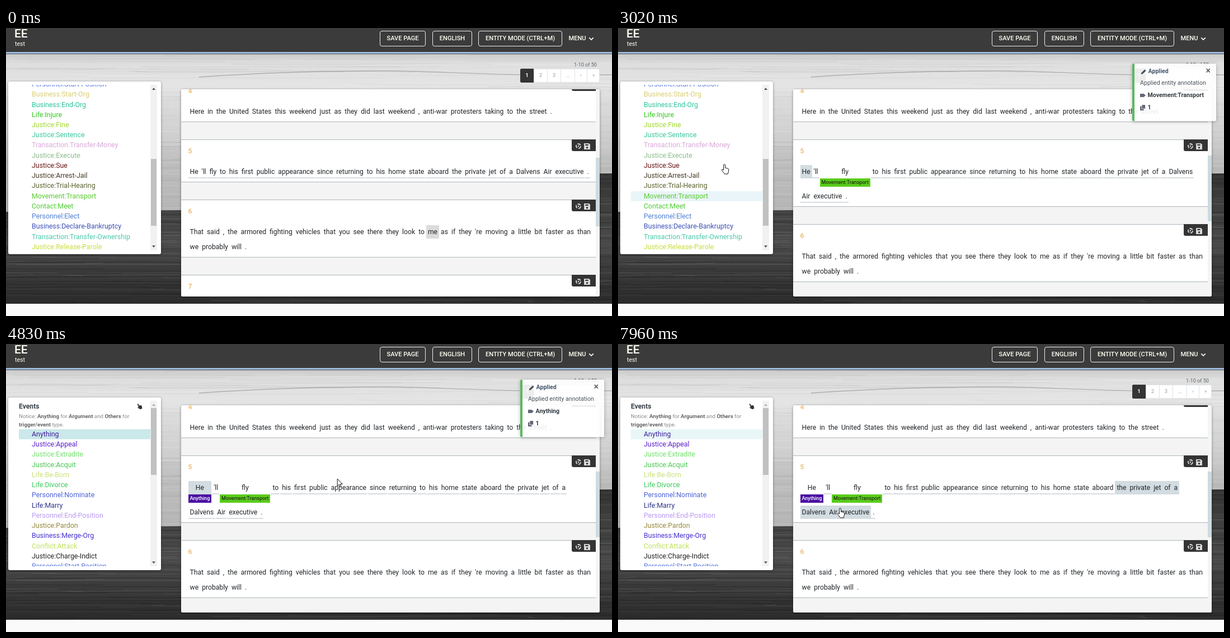
An HTML page with a canvas that plays this animation: 1083x517 px, repeating every 8 s.

```html
<!DOCTYPE html>
<html lang="en">
<head>
<meta charset="utf-8">
<title>Event annotation</title>
<style>
html, body { margin: 0; width: 100%; height: 100%; overflow: hidden; background: #fafafa; }
body { position: relative; font: 12.16px/20px Roboto, sans-serif; color: #212529; }
div, canvas, svg { position: absolute; box-sizing: border-box; }
b { font-weight: 500; }
.label { white-space: pre; height: 20px; }
#wood { left: 0; top: 47px; }
#head { left: 0; top: 0; width: 100%; height: 47px; background: linear-gradient(#3b3b3b 43px, #9dbbdc 43px 46px, #4a4f55 46px); color: #fffff4; }
.btn { top: 5px; height: 28px; border: 1px solid #eee; border-radius: 4px; font: 500 11.1px/26px Roboto, sans-serif; text-align: center; }
.card { background: #fff; border-radius: 3px; box-shadow: 0 1px 4px #0006; overflow: hidden; }
#side { left: 4px; top: 96px; width: 273px; height: 310px; }
#view { left: 19px; top: 6px; width: 235px; height: 297px; overflow: hidden; }
#list { left: 0; top: 0; width: 235px; }
.row { left: 0; width: 235px; height: 18.24px; padding-left: 23px; font-size: 12.4px; line-height: 18.24px; white-space: pre; }
.hint { font-size: 9.73px; color: #888; }
.hint b { color: #666; font-weight: 700; }
#bar { left: 254px; top: 6px; width: 12px; height: 297px; background: #f1f1f1; }
#thumb { left: 1px; width: 10px; height: 120px; background: #c1c1c1; }
#main { left: 313px; top: 110px; width: 748px; height: 372px; }
#flow { left: 0; top: -18px; width: 741px; background: #f4f4f4; }
.sec { position: relative; width: 741px; background: #fff; border: solid #abb5bb; border-width: 1px 0; margin-bottom: 31px; }
.num { left: 12.5px; top: 10px; color: #efc27c; font-weight: 700; }
.badge { right: 0; top: -1px; width: 43px; height: 21px; background: #343434; border-radius: 0 0 0 3px; }
.text { left: 12.5px; top: 45px; width: 760px; display: flex; flex-wrap: wrap; align-items: flex-start; }
.text i { flex: 0 0 100%; height: 0; }
.text span { padding: 0 3.03px; margin-bottom: 3px; line-height: 24px; text-align: center; white-space: pre; }
.text.live span { padding: 0; background: linear-gradient(#d7dcde, #d7dcde) 0 100% / calc(100% - 1px) 2px no-repeat; }
.text.live em { display: block; font-style: normal; padding: 0 2.98px; height: 24px; }
.text.live span.tagged { background: none; margin-right: 1px; margin-bottom: 4.5px; }
.text u { display: block; padding: 0 2.9px; font-size: 9.1px; line-height: 15px; text-decoration: none; }
#pager { left: 918px; top: 73px; width: 143px; height: 25px; background: #fff; border: 1px solid #dee2e6; border-radius: 3px; }
#pager div { top: -1px; height: 25px; border-left: 1px solid #dee2e6; font-size: 9px; line-height: 25px; text-align: center; color: #999; }
#pager div:first-child { background: #343434; color: #fff; font-weight: 700; border-radius: 3px 0 0 3px; }
#toast { left: 919px; top: 64px; width: 150px; height: 103px; background: #ffffffe8; border-left: 4px solid #5cb860; border-radius: 2px; box-shadow: 0 1px 6px #0004; font-size: 10.64px; color: #4a545c; }
#halo { width: 24px; height: 24px; border-radius: 50%; background: #fdec30; mix-blend-mode: multiply; }
</style>
</head>
<body>
<canvas id="wood" width="1083" height="448"></canvas>
<div id="head"></div>
<div id="pager"></div>
<div id="side" class="card">
  <div id="view"><div id="list"></div></div>
  <div id="bar">
    <svg width="12" height="297"><path id="up" d="M3 9l3-3.500 3 3.500z"/><path d="M3 288.500l3 3.500 3-3.500z" fill="#444"/></svg>
    <div id="thumb"></div>
  </div>
</div>
<div id="main" class="card"><div id="flow"></div>
  <div style="right:0;top:0;width:7px;height:100%;background:#f4f5f5"></div>
  <div id="thumb2" style="right:0;width:7px;background:#cddbdf"></div>
</div>
<div id="toast"></div>
<div id="halo"></div>
<svg id="cursor" width="18" height="22" viewBox="-1 -1 18 22"><path fill="#fff" stroke="#111"/></svg>
<script>
const $ = id => document.getElementById(id);
const HAND = 'M4 1.500q1.500-2 3 0V7l5 1.200q1.500.5 1.200 2.500l-.7 4-1 3.300H5.800L1 11.500Q0 9.500 2 9.500l2 1.500z';
const ARROW = 'M.5.5v13l3-2.800 2 4.400 2-1-2-4.200h4z';

function add(parent, cls, html = '', css = '', tag = 'div') {
  const e = document.createElement(tag);
  e.className = cls; e.innerHTML = html; e.style.cssText = css;
  return parent.appendChild(e);
}
// Places a text by its left edge and vertical centre.
const label = (parent, x, y, html, css = '', cls = '') =>
  add(parent, 'label ' + cls, html, `left:${x}px;top:${y - 10}px;${css}`);
const icon = (x, y, w, body, color) =>
  `<svg width="${w}" height="${w}" viewBox="0 0 12 12" style="left:${x - w / 2}px;top:${y - w / 2}px" fill="${color}">${body}</svg>`;

// Pale planks above, dark planks below a slanted seam, both with fine grain.
function drawWood() {
  const g = $('wood').getContext('2d');
  let seed = 7;
  const rnd = () => (seed = seed * 16807 % 2147483647) / 2147483647;
  const shade = stops => {
    const grad = g.createLinearGradient(0, 0, 0, 448);
    stops.forEach(([p, v]) => grad.addColorStop(p, `rgb(${v},${v},${v})`));
    return grad;
  };
  const grain = (count, y, height, dark, light, alpha) => {
    for (let i = 0; i < count; i++) {
      const v = rnd() < .5 ? dark : light, x = rnd() * 1200 - 250, w = 150 + rnd() * 450, d = rnd() * 12 - 6;
      const y0 = y + rnd() * height;
      g.strokeStyle = `rgba(${v},${v},${v},${alpha})`;
      g.lineWidth = .6 + rnd() * 1.8;
      g.beginPath();
      g.moveTo(x, y0);
      g.bezierCurveTo(x + w / 3, y0 + d, x + w * 2 / 3, y0 - d, x + w, y0 + d / 3);
      g.stroke();
    }
  };
  g.fillStyle = shade([[0, 204], [.04, 222], [.12, 228], [.2, 218], [.32, 208], [.45, 188], [.64, 182]]);
  g.fillRect(0, 0, 1083, 448);
  grain(260, 0, 280, 130, 255, .08);
  g.strokeStyle = 'rgba(95,95,95,.4)';
  g.lineWidth = 1.3;
  g.beginPath();
  g.moveTo(345, 41);
  g.bezierCurveTo(460, 33, 560, 30, 680, 30);
  g.bezierCurveTo(780, 30, 860, 40, 1083, 37);
  g.stroke();

  g.fillStyle = shade([[.46, 50], [.6, 62], [.75, 74], [.84, 62], [1, 42]]);
  g.beginPath();
  g.moveTo(0, 283);
  g.lineTo(320, 280);
  g.bezierCurveTo(560, 270, 800, 216, 1083, 214);
  g.lineTo(1083, 448);
  g.lineTo(0, 448);
  g.fill();
  g.clip();
  grain(400, 214, 234, 15, 140, .12);
}

const head = $('head');
label(head, 15, 9.5, 'EE', 'font-size:21px;font-weight:500');
label(head, 16, 28.5, 'test', 'font-size:10.64px');
[[668, 82, 'SAVE PAGE'], [762, 71, 'ENGLISH'], [844, 150, 'ENTITY MODE (CTRL+M)']]
  .forEach(([x, w, s]) => add(head, 'btn', s, `left:${x}px;width:${w}px`));
label(head, 1005.5, 18.5, 'MENU', 'font-size:11.1px;font-weight:500');
head.innerHTML += icon(1046, 19, 10, '<path d="M1.500 4L6 8.500 10.500 4" fill="none" stroke="#fff" stroke-width="2"/>', 'none');

label(document.body, 1015, 65.5, '1-10 of 50', 'font-size:9.1px;color:#5a6268');
document.body.insertBefore(document.body.lastChild, $('toast'));
[[-1, 25, 1], [24, 24, 2], [48, 24, 3], [72, 25, '…'], [97, 22, '›'], [119, 23, '»']]
  .forEach(([x, w, s]) => add($('pager'), '', s, `left:${x}px;width:${w}px`));

const list = $('list');
label(list, 0, 9.5, 'Events', 'font-weight:700;color:#3a4249');
label(list, 0, 28, 'Notice: <b>Anything</b> for <b>Argument</b> and <b>Others</b> for', '', 'hint');
label(list, 0, 43, '<b>trigger/event</b> type.', '', 'hint');
add(list, '', `<svg width="12" height="12" viewBox="0 0 15 19"><path d="${HAND}" fill="#333" transform="rotate(-25 7 10)"/></svg>`, 'left:210px;top:4px');
const rows = `Anything 3f219c,Justice:Appeal 5b20cc,Justice:Extradite 72e06c,Justice:Acquit 45c94e,Life:Be-Born c8e07a,
Life:Divorce 3cc95c,Personnel:Nominate 4a62d8,Life:Marry 2a3284,Personnel:End-Position b99af0,Justice:Pardon 94873c,
Business:Merge-Org 4430d0,Conflict:Attack bfe05c,Justice:Charge-Indict 242424,Personnel:Start-Position 5a76e0,
Business:Start-Org d9cd74,Business:End-Org 2bc49a,Life:Injure 36c422,Justice:Fine a2d92c,Justice:Sentence 3cc79e,
Transaction:Transfer-Money d9a8da,Justice:Execute 8cbc8c,Justice:Sue 6a1414,Justice:Arrest-Jail 443a24,
Justice:Trial-Hearing 5d6432,Movement:Transport 5acb30,Contact:Meet 4ccc32,Personnel:Elect 4f7fd0,
Business:Declare-Bankruptcy 3c50b8,Transaction:Transfer-Ownership 4cc8ac,Justice:Release-Parole c8dc3a`
  .split(/,\s*/).map((s, i) => {
    const [name, color] = s.split(' ');
    return add(list, 'row', name, `top:${50.9 + i * 18.24}px;color:#${color}`);
  });

const badge = icon(12, 12, 12, '<circle cx="6" cy="6" r="4" fill="none" stroke="#ddd" stroke-width="1.800" stroke-dasharray="6 2.400"/><circle cx="6" cy="6" r="1.200"/>', '#ddd')
  + icon(27, 12, 13, '<path d="M1 1h8l2 2v8H1z"/><path d="M3 2.500h5v2H3z" fill="#343434"/><circle cx="6" cy="8" r="1.600" fill="#343434"/>', '#ddd');
function section(num, height, words, live) {
  const sec = add($('flow'), 'sec', '', `height:${height}px`);
  label(sec, 12.5, 20, num, '', 'num');
  add(sec, 'badge', badge);
  const text = add(sec, live ? 'text live' : 'text');
  const tokens = words.split(' ').map(w => add(text, '', live ? `<em>${w}</em>` : w, '', 'span'));
  return { sec, text, tokens };
}
section(4, 77, 'Here in the United States this weekend just as they did last weekend , anti-war protesters taking to the street .');
const s5 = section(5, 77, "He 'll fly to his first public appearance since returning to his home state aboard the private jet of a Dalvens Air executive .", true);
const s6 = section(6, 104, "That said , the armored fighting vehicles that you see there they look to me as if they 're moving a little bit faster as than we probably will .");
section(7, 104, '');
s6.text.insertBefore(document.createElement('i'), s6.tokens[26]);
const lineBreak = document.createElement('i');
const tag = (word, name, css) => add(word, '', name, css, 'u');
const flyTag = tag(s5.tokens[2], 'Movement:Transport', 'background:#5acc1c;color:#111');
const heTag = tag(s5.tokens[0], 'Anything', 'background:#4a0fa2;color:#fff;font-weight:500');

const toast = $('toast');
toast.innerHTML = icon(16, 14, 11, '<path d="M1 11l.6-3L8 1.500 10.500 4 4 10.400z"/>', '#455058')
  + icon(15, 57, 10, '<path d="M0 2.500h8L12 6 8 9.500H0z"/>', '#667')
  + icon(15, 79, 10, '<path d="M4 0h7v8H4z"/><path d="M0 3h3v6h5v3H0z"/>', '#667');
label(toast, 24.5, 13.5, 'Applied', 'font-weight:700;color:#42566b');
label(toast, 127.5, 12.5, '×', 'font-size:16px;font-weight:700;color:#666');
label(toast, 10, 35, 'Applied entity annotation');
const applied = label(toast, 23.5, 57, '', 'font-weight:700;color:#333b42');
label(toast, 23.5, 79, '1', 'font-weight:700;color:#333b42');

const smooth = p => p * p * (3 - 2 * p);
// Value of a [time, ...values] track, eased between its stops.
function track(stops, t) {
  const i = stops.findIndex(s => s[0] > t);
  if (i < 0) return stops[stops.length - 1].slice(1);
  if (!i) return stops[0].slice(1);
  const a = stops[i - 1], b = stops[i], p = smooth((t - a[0]) / (b[0] - a[0]));
  return a.slice(1).map((v, j) => v + (b[j + 1] - v) * p);
}
const PATH = [[130, 945, 480], [810, 371, 257], [960, 371, 257], [1640, 108, 298], [1970, 108, 298], [2220, 341, 274],
  [2550, 337, 259], [2820, 337, 259], [3120, 140, 239], [3900, 140, 239], [4150, 92, 157], [4500, 92, 157],
  [5050, 860, 287], [5120, 860, 287], [5480, 895, 265], [5780, 920, 262], [6340, 920, 262], [6890, 361, 299],
  [7160, 361, 299], [7560, 419, 298], [7890, 419, 298], [7960, 397, 294]];
const SCROLL = [[3140, 298], [3400, 77], [3430, 77], [3490, 0]];
const PRESSES = [[960, 1100], [1900, 2040], [2750, 2890], [4300, 4440], [5930, 6340], [6960, 7890]];
// word, hover start, selection start, end
const MARKS = [[2, 740, 960, 2750], [0, 2480, 2750, 6480], [15, 5400, 5650, 5650], [16, 5650, 5930, 8000], [15, 6070, 6070, 8000],
  [17, 7030, 7030, 8000], [18, 7030, 7030, 8000], [19, 7030, 7030, 8000], [20, 7030, 7030, 8000], [21, 7300, 7300, 8000], [22, 7420, 7420, 8000]];

let shown = -1;
function setStage(n) {
  if (n === shown) return;
  shown = n;
  flyTag.style.display = n > 0 ? '' : 'none';
  heTag.style.display = n > 1 ? '' : 'none';
  s5.tokens[2].className = n > 0 ? 'tagged' : '';
  s5.tokens[0].className = n > 1 ? 'tagged' : '';
  if (n) s5.text.insertBefore(lineBreak, s5.tokens[22 - n]);
  else lineBreak.remove();
  s5.sec.style.height = (n ? 121 : 77) + 'px';
  $('thumb2').style.top = (n ? 119 : 123) + 'px';
  $('thumb2').style.height = (n ? 118 : 123) + 'px';
  applied.textContent = n > 1 ? 'Anything' : 'Movement:Transport';
}

function draw(t) {
  setStage(t < 2050 ? 0 : t < 4570 ? 1 : 2);
  toast.style.display = t >= 2050 && t < 6410 ? '' : 'none';

  const [scroll] = track(SCROLL, t);
  list.style.top = -scroll + 'px';
  $('thumb').style.top = 13 + scroll * .404 + 'px';
  $('up').setAttribute('fill', scroll > 0 ? '#444' : '#aaa');
  rows[24].style.background = t < 1900 ? '' : t < 2050 ? '#dedede' : '#e9f5f8';
  rows[0].style.background = t < 4300 ? '' : t < 4570 ? '#dedede' : t < 6480 ? '#cbe8ea' : '#e8f6f7';

  s5.tokens.forEach(w => w.firstChild.style.background = '');
  for (const [i, hover, pick, end] of MARKS)
    if (t >= hover && t < end) s5.tokens[i].firstChild.style.background = t < pick ? '#e4e9eb' : '#d2dce1';
  s6.tokens[14].style.background = t < 1030 ? '#dcdcdc' : '';

  const [x, y] = track(PATH, t);
  const hand = x < 277 || y > 246 && y < 271 || t > 6400 && y > 289;
  const cur = $('cursor');
  cur.style.display = t < 130 ? 'none' : '';
  cur.firstChild.setAttribute('d', hand ? HAND : ARROW);
  cur.style.transform = `translate(${x - (hand ? 6.5 : 1)}px,${y - 1}px)`;
  cur.style.left = cur.style.top = 0;
  const halo = $('halo').style;
  halo.display = PRESSES.some(([a, b]) => t >= a && t < b) ? '' : 'none';
  halo.left = x - 13 + 'px';
  halo.top = y - 8 + 'px';
}

drawWood();
const start = performance.now();
(function loop() {
  draw((performance.now() - start) % 8000);
  requestAnimationFrame(loop);
})();
</script>
</body>
</html>
```
